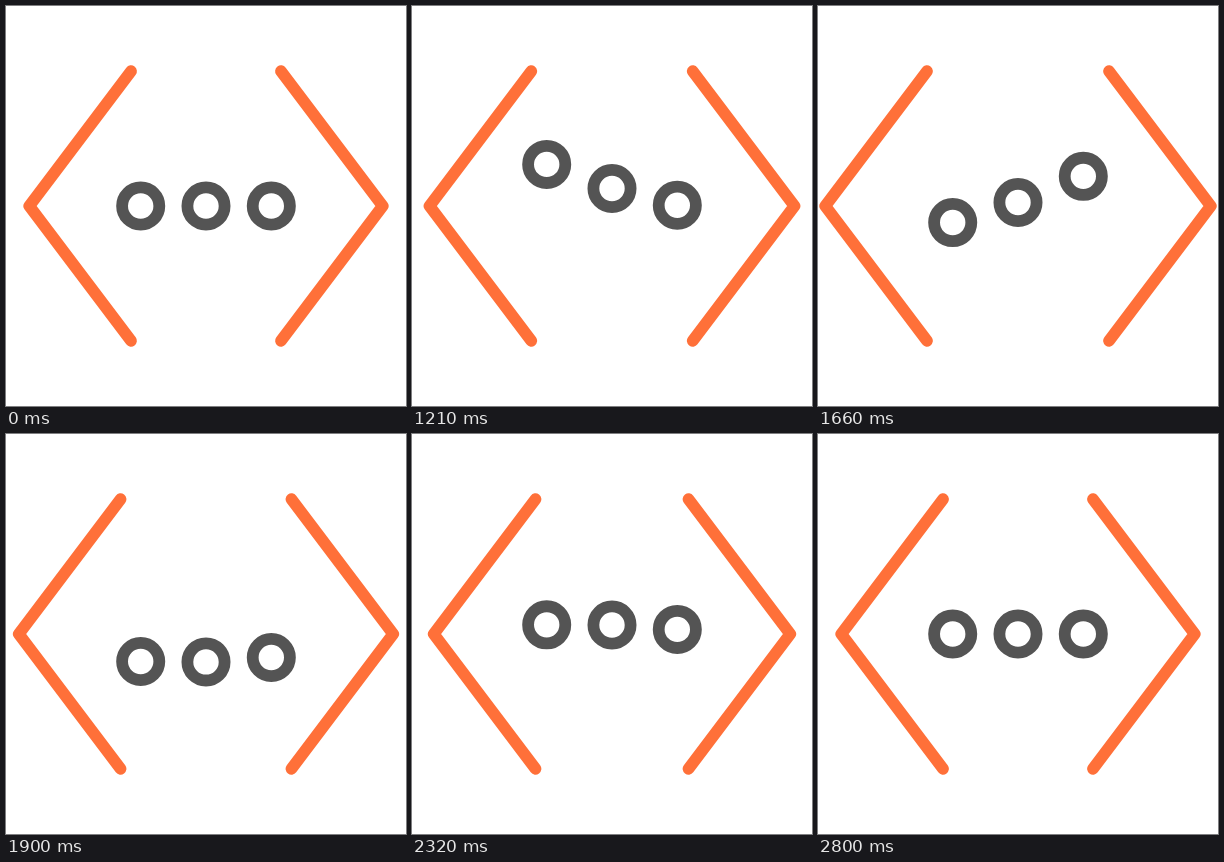
An HTML page that plays this animation: 400x400 px, repeating every 2.83 s.

```html
<!DOCTYPE html>
<html lang="en">
<head>
<meta charset="utf-8">
<title>Code brackets</title>
<style>
  html, body { margin: 0; width: 100%; height: 100%; overflow: hidden; background: #fff; }
  svg { display: block; width: 100vw; height: 100vh; }
</style>
</head>
<body>
<svg viewBox="0 0 400 400" fill="none" stroke-width="11.8" stroke-linecap="round" stroke-linejoin="round">
  <g stroke="#ff7039">
    <path id="left" d="M125 65.2 23.3 200 125 334.8"/>
    <path id="right" d="M275 65.2 376.7 200 275 334.8"/>
  </g>
  <g stroke="#545454">
    <circle class="dot" cx="134.7" cy="200" r="18.6"/>
    <circle class="dot" cx="200" cy="200" r="18.6"/>
    <circle class="dot" cx="265.3" cy="200" r="18.6"/>
  </g>
</svg>
<script>
const LOOP = 2830, HOLD = 1000, STEP = 30, DOT_DELAY = 3;

const swing = x => ease(x, 0.5, 0.38);
const settle = x => ease(x, 0.42, 0.13);

// Offset from rest, reached at each step with the given easing
const BOUNCE = [
  { step: 0, offset: 0 },
  { step: 10, offset: -46.7, easing: swing },
  { step: 28.4, offset: 28.3, easing: swing },
  { step: 42.5, offset: -9.4, easing: swing },
  { step: 54, offset: 0, easing: swing }
];
const SPREAD = [
  { step: 0, offset: 0 },
  { step: 18, offset: 16.4, easing: swing },
  { step: 60, offset: 0, easing: settle }
];

const left = document.getElementById("left");
const right = document.getElementById("right");
const dots = [...document.querySelectorAll(".dot")];

// Cubic ease with handles (x1, 0) and (x2, 1)
function ease(x, x1, x2) {
  let low = 0, high = 1, s = 0.5;
  for (let i = 0; i < 24; i++) {
    s = (low + high) / 2;
    const at = 3 * (1 - s) ** 2 * s * x1 + 3 * (1 - s) * s * s * x2 + s ** 3;
    if (at < x) low = s; else high = s;
  }
  return s * s * (3 - 2 * s);
}

function offsetAt(keys, step) {
  if (step <= 0) return 0;
  const next = keys.findIndex(key => key.step > step);
  if (next < 0) return keys[keys.length - 1].offset;
  const from = keys[next - 1], to = keys[next];
  const progress = (step - from.step) / (to.step - from.step);
  return from.offset + (to.offset - from.offset) * to.easing(progress);
}

function draw(time) {
  const step = Math.max(0, Math.floor((time % LOOP - HOLD) / STEP));
  const shift = offsetAt(SPREAD, step);
  left.setAttribute("transform", `translate(${-shift} 0)`);
  right.setAttribute("transform", `translate(${shift} 0)`);
  dots.forEach((dot, i) => dot.setAttribute("cy", 200 + offsetAt(BOUNCE, step - i * DOT_DELAY)));
}

const start = performance.now();
function tick() {
  draw(performance.now() - start);
  requestAnimationFrame(tick);
}
tick();
</script>
</body>
</html>
```
